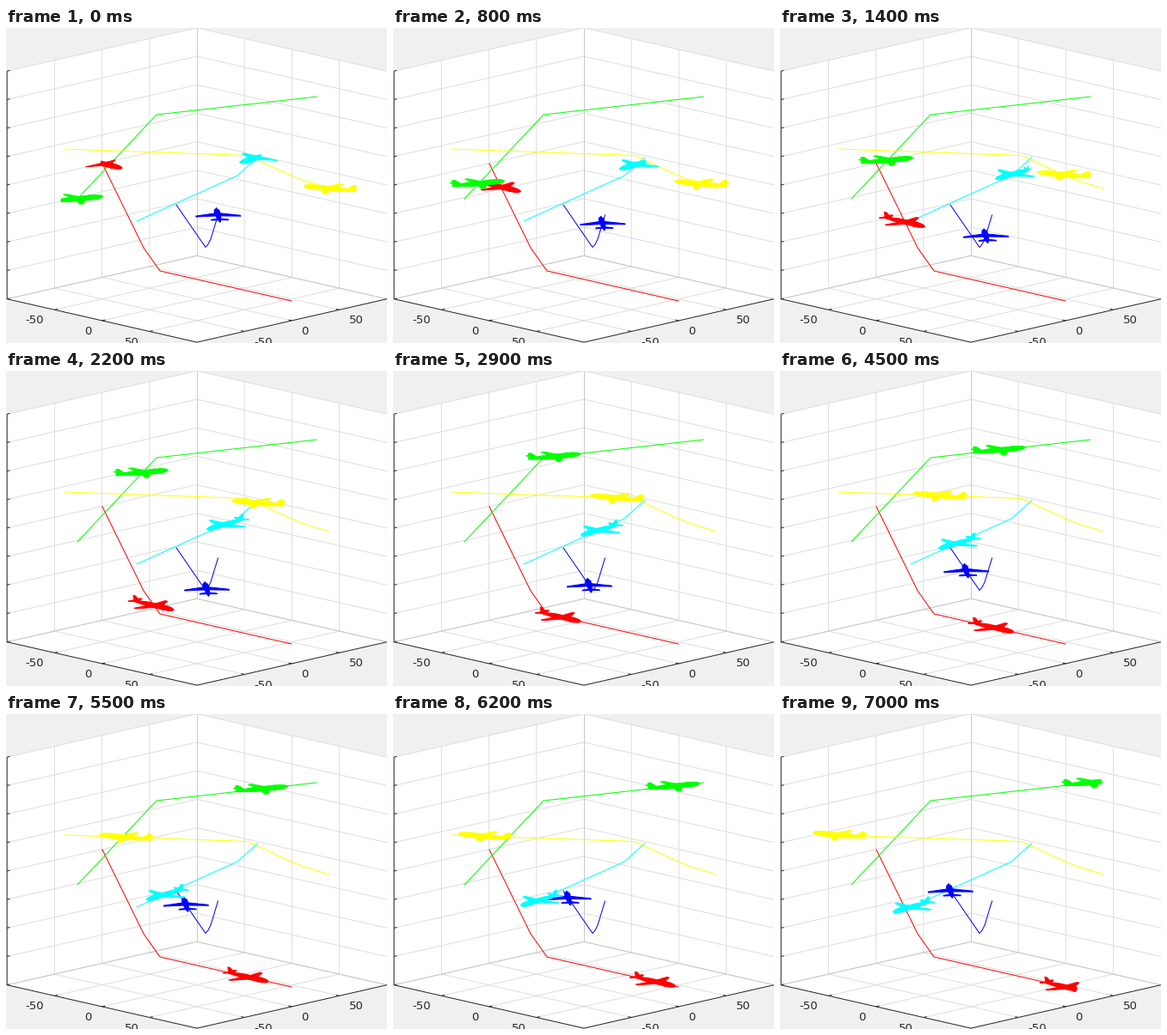
A matplotlib script for the animation above (7100 ms loop, 443x367 px).

```python
import numpy as np
import matplotlib.pyplot as plt
from matplotlib.animation import FuncAnimation
from matplotlib.collections import LineCollection, PolyCollection

W, H, DPI = 443, 367, 100
STEPS, HOLD = 66, 4          # moves per loop, extra ticks on the first pose
PX = 72 / DPI                # one pixel in points
TILT = 0.23                  # sine of the camera elevation
INK = "#262626"

fig = plt.figure(figsize=(W / DPI, H / DPI), dpi=DPI, facecolor="#f0f0f0")
ax = fig.add_axes([0, 0, 1, 1])
ax.set_xlim(0, W)
ax.set_ylim(H, 0)
ax.axis("off")


# ---- box: floor coordinates u, v in -1..1, height w in 0..1 ----
def box(u, v, w=0.0):
    return 222 + 110.4 * (u + v), 315.7 + 25.2 * (u - v) - 265.5 * w


def segments(lines, color, width=1.0, z=1):
    ax.add_collection(LineCollection(lines, colors=color, linewidths=width * PX, zorder=z))


outline = [box(-1, -1), box(1, -1), box(1, 1), box(1, 1, 1), box(-1, 1, 1), box(-1, -1, 1)]
ax.add_patch(plt.Polygon(outline, fc="white", ec="none", zorder=0))

grid = []
for t in (-0.5, 0, 0.5):
    grid += [[box(t, -1), box(t, 1), box(t, 1, 1)],
             [box(1, t), box(-1, t), box(-1, t, 1)]]
for w in np.linspace(0, 1, 9):
    grid.append([box(-1, -1, w), box(-1, 1, w), box(1, 1, w)])
segments(grid, "#dedede")
segments([[box(-1, 1), box(-1, 1, 1)],
          [box(-1, -1), box(-1, 1), box(1, 1)]], "#c9c9c9")

rulers = [[box(-1, -1, 1), box(-1, -1), box(1, -1), box(1, 1)]]
for t in (-0.5, 0, 0.5):
    rulers += [[box(t, -1), box(t, -0.965)], [box(1, t), box(0.965, t)]]
for w in np.linspace(0, 1, 9):
    rulers.append([box(-1, -1, w), box(-1, -0.97, w)])
segments(rulers, INK, z=2)

for t, label in ((-0.5, "-50"), (0, "0"), (0.5, "50")):
    for (x, y), dx, align in ((box(t, -1), -12, "right"), (box(1, t), 11, "left")):
        ax.text(x + dx, y + 11, label, ha=align, va="center_baseline", color=INK,
                family="DejaVu Sans", fontsize=13.3 * PX, zorder=2)


# ---- aircraft model: forward, left, up ----
def flat(pts, up=0.0, side=1):
    return np.array([(a, side * b, up) for a, b in pts], float)


def upright(pts):
    return np.array([(a, 0, c) for a, c in pts], float)


hull = [(32, 0), (29, 1.8), (22, 2.8), (-10, 2.6), (-33, 0.7)]
hull += [(a, -b) for a, b in hull[:0:-1]]
wing = [(10, 2), (-3, 26), (-7, 26), (-4, 2)]
tail = [(-24, 0.5), (-29, 10), (-32, 10), (-31, 0.5)]
fin = [(-22, 1), (-30, 6.5), (-33.5, 6.5), (-32, 0)]
turn = np.linspace(0, 2 * np.pi, 16, endpoint=False)
ring = np.column_stack([np.full(16, 15.0), 3.2 * np.cos(turn), 3.2 * np.sin(turn)])
MODEL = [flat(hull), upright(hull), upright(fin), ring]
MODEL += [flat(p, up, s) for p, up in ((wing, 0), (tail, 1.5)) for s in (1, -1)]


def rotated(heading):
    """Model parts as (right, depth, up) for a heading in degrees."""
    c, s = np.cos(np.radians(heading)), np.sin(np.radians(heading))
    return [p @ np.array([[c, s, 0], [-s, c, 0], [0, 0, 1]]) for p in MODEL]


def clip(poly, nx, nd, limit):
    """Keep the side of poly where nx*right + nd*depth <= limit."""
    out = []
    if len(poly) == 0:
        return poly
    d = poly[:, 0] * nx + poly[:, 1] * nd - limit
    for i in range(len(poly)):
        p, q, dp, dq = poly[i - 1], poly[i], d[i - 1], d[i]
        if (dp <= 0) != (dq <= 0):
            out.append(p + (q - p) * dp / (dp - dq))
        if dq <= 0:
            out.append(q)
    return np.array(out)


class Plane:
    def __init__(self, color, heading, path, walls=()):
        self.path = np.array(path, float)
        self.parts = rotated(heading)
        self.walls = walls   # (nx, nd, step at the wall, margin there, speed)
        ax.plot(*self.path.T, color=color, lw=PX, zorder=3)
        self.art = PolyCollection([], facecolors=color, edgecolors=color,
                                  linewidths=PX, zorder=4)
        ax.add_collection(self.art)

    def position(self, k):
        xs, ys = self.path.T
        x = xs[0] + (xs[-1] - xs[0]) * k / STEPS
        order = np.argsort(xs)
        return x, np.interp(x, xs[order], ys[order])

    def move(self, k):
        x, y = self.position(k)
        verts = []
        for part in self.parts:
            for nx, nd, at, margin, speed in self.walls:
                part = clip(part, nx, nd, margin + speed * abs(k - at))
            if len(part):
                verts.append(np.column_stack([
                    x + part[:, 0], y - TILT * part[:, 1] - 0.97 * part[:, 2]]))
        self.art.set_verts(verts)


planes = [
    Plane("#ff0000", -44, [(112, 158), (160, 256), (179, 283), (332, 318)],
          [(-1, 1, 0, 3, 6.4), (1, -1, STEPS, 22, 6.4)]),
    Plane("#00ff00", 22, [(83, 199), (175, 101), (361, 80)],
          [(-1, -1, 0, 26, 5.9), (1, 1, STEPS, 17, 5.9)]),
    Plane("#0000ff", 94, [(246.5, 218), (238, 246), (235, 252), (232, 255.5), (198, 206)]),
    Plane("#00ffff", 230, [(292.5, 151), (269, 172), (152, 225)],
          [(1, 1, 0, 8, 3)]),
    Plane("#ffff00", 158, [(376, 187), (345, 177.5), (325, 169), (281, 148.5), (68, 141)]),
]


def update(i):
    k = max(0, i - HOLD)
    for p in planes:
        p.move(k)
    return [p.art for p in planes]


anim = FuncAnimation(fig, update, frames=STEPS + HOLD + 1, interval=100,
                     repeat=True, repeat_delay=0, blit=False)
plt.show()
```
